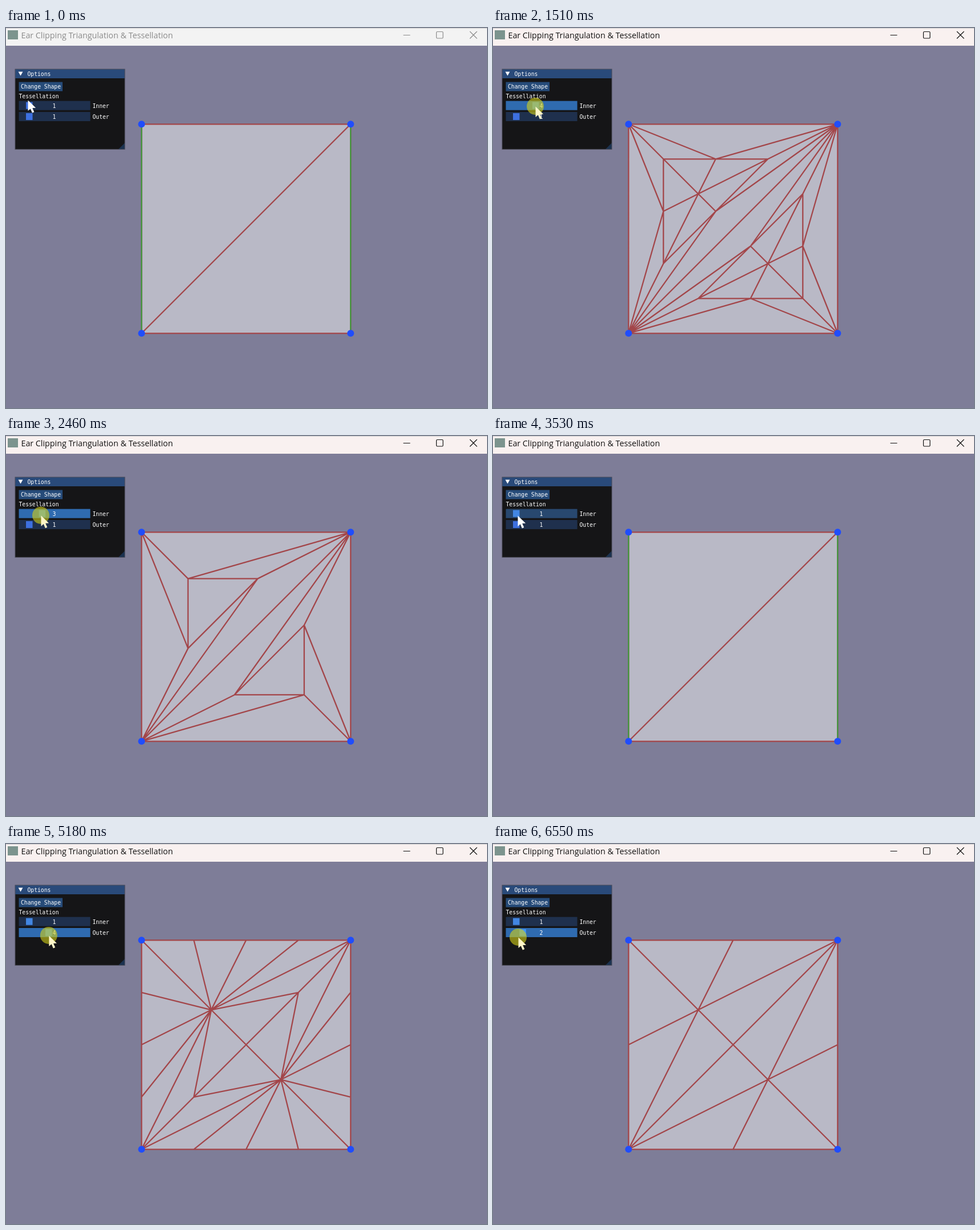
An HTML page with a canvas that plays this animation: 842x665 px, repeating every 6620 ms.

```html
<!DOCTYPE html>
<html lang="en">
<head>
<meta charset="utf-8">
<title>Ear Clipping Triangulation &amp; Tessellation</title>
<style>
html, body { margin: 0; width: 100%; height: 100%; overflow: hidden; background: #7e7d98; }
canvas { display: block; }
</style>
</head>
<body>
<canvas id="stage" width="842" height="665"></canvas>
<script>
const ctx = document.getElementById('stage').getContext('2d');
const LOOP = 6620, STEP = 11.3;
const LEFT = 237.3, TOP = 168.3, SIZE = 366;
const [A, B, C, D] = [0, 1, 2, 3].map(i => [LEFT + SIZE * (i & 1), TOP + SIZE * (i >> 1)]);
const INNER_DRAG = [600, 3530], OUTER_DRAG = [4200, LOOP];

// Mouse moves, each easing out: start, end, x, y
const moves = [
  [70, 740, 42, 135], [740, 1510, 74, 137], [1510, 1990, 81, 137],
  [2320, 2520, 59, 139], [2720, 3200, 43, 139], [3530, 3670, 43, 142],
  [3930, 4200, 43, 156], [4200, 4560, 57, 157], [4560, 5250, 75, 160],
  [5650, 6210, 49, 162], [6410, 6550, 44, 163]
];

const within = (t, [from, to]) => t >= from && t < to;
const lerp = (p, q, u) => [p[0] + (q[0] - p[0]) * u, p[1] + (q[1] - p[1]) * u];

function mouseAt(t) {
  return moves.reduce((p, [start, end, ...q]) => {
    const u = Math.min(1, Math.max(0, (t - start) / (end - start)));
    return lerp(p, q, 1 - (1 - u) ** 2);
  }, [38, 126]);
}

function rect(x, y, w, h, color) {
  ctx.fillStyle = color;
  ctx.fillRect(x, y, w, h);
}

function disc(x, y, r, color) {
  ctx.fillStyle = color;
  ctx.beginPath();
  ctx.arc(x, y, r, 0, 7);
  ctx.fill();
}

function poly(points, color) {
  ctx.fillStyle = color;
  ctx.beginPath();
  points.forEach(p => ctx.lineTo(...p));
  ctx.fill();
}

function lines(pairs, color, width) {
  ctx.strokeStyle = color;
  ctx.lineWidth = width;
  ctx.beginPath();
  for (const [p, q] of pairs) {
    ctx.moveTo(...p);
    ctx.lineTo(...q);
  }
  ctx.stroke();
}

function label(s, x, y, align = 'left') {
  ctx.font = '9.7px "DejaVu Sans Mono", monospace';
  ctx.fillStyle = '#fff';
  ctx.textAlign = align;
  ctx.fillText(s, x, y);
}

// Concentric rings, each stitched to the next one inwards
function tessellate(tri, inner, outer) {
  const n = outer > 1 ? Math.max(inner, 2) : inner;
  const mid = [0, 1].map(i => (tri[0][i] + tri[1][i] + tri[2][i]) / 3);
  const ring = k => tri.map(p => lerp(p, mid, 2 * k / n));
  const pairs = [];
  for (let k = 0; n - 2 * k > 0; k++) {
    const a = k ? n - 2 * k : outer, b = n - 2 * k - 2;
    const out = ring(k), inn = ring(k + 1);
    for (let e = 0; e < 3; e++) {
      const f = (e + 1) % 3;
      pairs.push([out[e], out[f]]);
      if (b < 0) continue;
      const join = (i, j) => pairs.push([
        lerp(out[e], out[f], i / a),
        b ? lerp(inn[e], inn[f], j / b) : mid
      ]);
      let i = 0, j = 0;
      join(i, j);
      while (i < a || j < b) {
        if (j < b && (i >= a || (j + .5) / b <= (i + .5) / a)) j++;
        else i++;
        join(i, j);
      }
    }
  }
  return pairs;
}

function drawShape(inner, outer) {
  rect(LEFT, TOP, SIZE, SIZE, '#b9b9c6');
  const pairs = [[B, A, C], [C, D, B]].flatMap(tri => tessellate(tri, inner, outer));
  lines(pairs, '#a3464a', 2.3);
  if (inner === 1 && outer === 1) lines([[A, C], [B, D]], '#36a23c', 2);
  [A, B, C, D].forEach(p => disc(...p, 6, '#204dfc'));
}

function drawTitleBar(active) {
  const ink = active ? '#111' : '#8b8b8b';
  rect(0, 0, 842, 31, active ? '#f9f1f0' : '#f3f3f3');
  rect(0, 0, 842, 1, '#d2d0d2');
  rect(3, 4, 18, 16, '#7c948e');
  ctx.font = '14.25px "Open Sans", "Noto Sans", sans-serif';
  ctx.fillStyle = ink;
  ctx.textAlign = 'left';
  ctx.fillText('Ear Clipping Triangulation & Tessellation', 26.5, 17.5);
  lines([
    [[695.5, 12.5], [707.5, 12.5]],
    [[812, 6], [824.5, 18.5]],
    [[824.5, 6], [812, 18.5]]
  ], ink, 1.2);
  ctx.beginPath();
  ctx.roundRect(753.5, 6.5, 11.5, 11.5, 1.5);
  ctx.stroke();
}

function drawSlider(y, name, value, state, grab) {
  rect(22.5, y, 125, 16, { idle: '#1f304d', hover: '#28486f', drag: '#2f6bb0' }[state]);
  rect(23.7 + STEP * value, y + 2, 11.5, 12, state === 'drag' ? '#4296fa' : grab);
  label(value, 84.5, y + 11.8, 'center');
  label(name, 151.5, y + 11.8);
}

function drawPanel(t, inner, outer, mouseY) {
  const innerDrag = within(t, INNER_DRAG), outerDrag = within(t, OUTER_DRAG);
  const over = y => !innerDrag && !outerDrag && mouseY > y && mouseY < y + 16;
  const state = (drag, y) => drag ? 'drag' : over(y) ? 'hover' : 'idle';
  rect(16, 72, 192, 140, '#151517');
  rect(16, 72, 192, 16, '#294a7a');
  poly([[208, 201], [208, 212], [197, 212]], '#1b3250');
  ctx.strokeStyle = '#4b4b58';
  ctx.lineWidth = 1;
  ctx.strokeRect(16, 72, 192, 140.3);
  poly([[21.5, 76.5], [29.5, 76.5], [25.5, 83.5]], '#fff');
  label('Options', 37.5, 83.7);
  rect(22.5, 94.5, 76.5, 16, '#264b79');
  label('Change Shape', 26, 106.2);
  label('Tessellation', 22.5, 122.8);
  drawSlider(127.7, 'Inner', inner, state(innerDrag, 127.7), t < INNER_DRAG[0] ? '#3d70e0' : '#4286e2');
  drawSlider(147, 'Outer', outer, state(outerDrag, 147), '#3d70e0');
  return innerDrag || outerDrag;
}

function drawMouse([x, y], pressed) {
  if (pressed) disc(x, y, 15, 'rgba(212,208,24,.6)');
  const arrow = [[0, 0], [0, 18.6], [4.3, 14.7], [7.4, 22], [10.8, 20.5], [7.7, 13.5], [13.6, 13.2]];
  poly(arrow.map(([dx, dy]) => [x + dx + .5, y + dy + .5]), pressed ? '#fff6c8' : '#fff');
}

function draw() {
  const t = performance.now() % LOOP;
  const mouse = mouseAt(t);
  const inner = within(t, INNER_DRAG) ? Math.floor((mouse[0] - 23) / STEP) : 1;
  const outer = within(t, OUTER_DRAG) ? Math.floor((mouse[0] - 21) / STEP) : 1;
  rect(0, 0, 842, 665, '#7e7d98');
  drawTitleBar(t >= INNER_DRAG[0]);
  drawShape(inner, outer);
  drawMouse(mouse, drawPanel(t, inner, outer, mouse[1]));
  requestAnimationFrame(draw);
}
draw();
</script>
</body>
</html>
```
